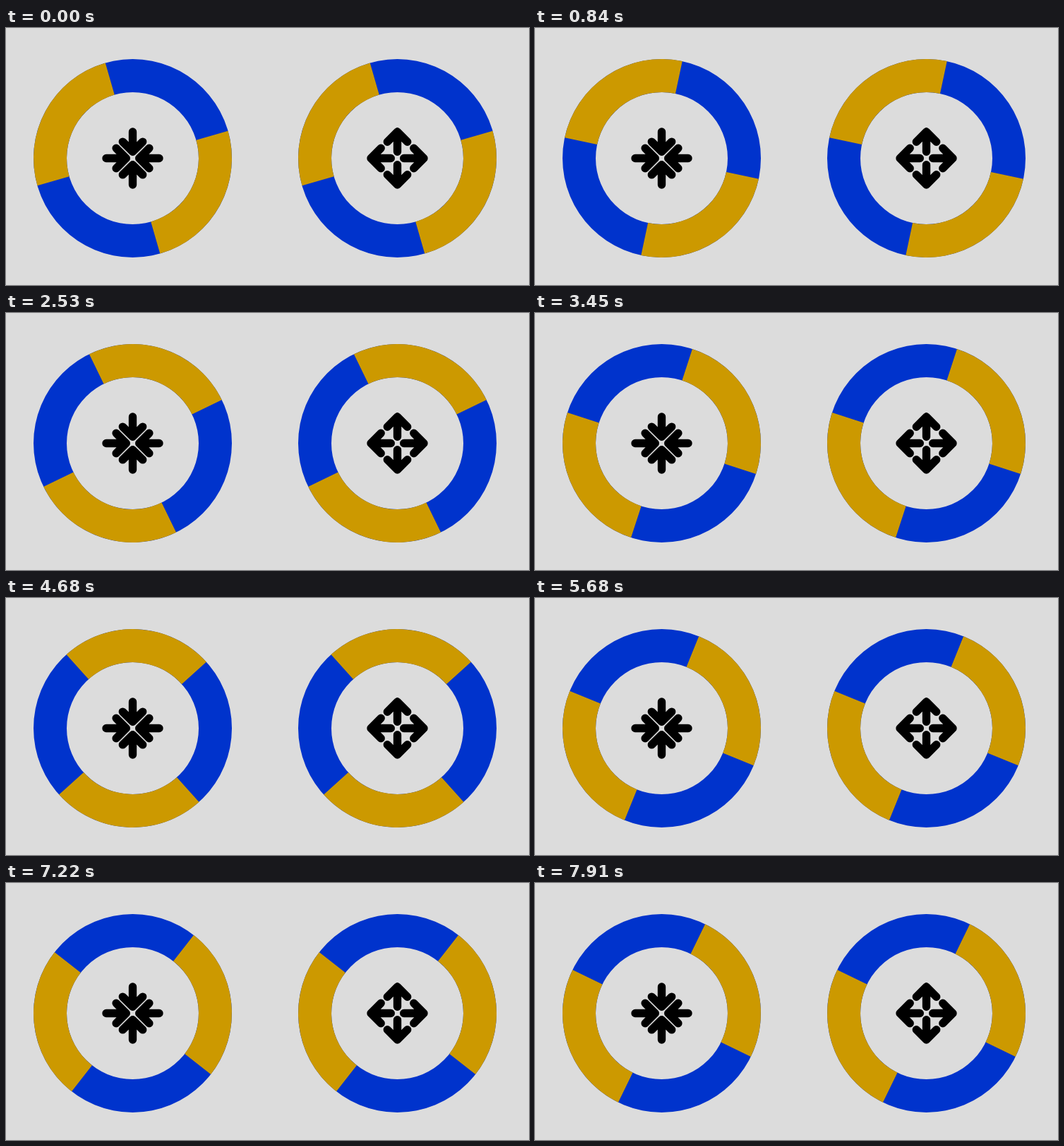
Animation of 741 by 364 pixels, one loop 7990 ms. Source, as an HTML page with a canvas:

```html
<!DOCTYPE html>
<html lang="en">
<head>
<meta charset="utf-8">
<title>Turning rings</title>
<style>
  html, body { margin: 0; width: 100%; height: 100%; overflow: hidden; background: #dcdcdc; }
  canvas { display: block; }
</style>
</head>
<body>
<canvas id="stage" width="741" height="364"></canvas>
<script>
const ctx = document.getElementById('stage').getContext('2d');

const LOOP = 7990;
const FRAMES = 104;
const LEAD = 11;              // ms by which each change leads an even beat
const STEPS_PER_FRAME = 4.69; // the rings turn in whole steps of 4 degrees
const STEP = 4;
const START = -16;

const BLUE = '#0033cc';
const GOLD = '#cc9900';
const OUTER = 140.5;
const INNER = 93.5;
const CY = 184.5;

const rad = deg => deg * Math.PI / 180;

function sector(from, sweep, color) {
  ctx.beginPath();
  ctx.arc(0, 0, OUTER, rad(from), rad(from + sweep));
  ctx.arc(0, 0, INNER, rad(from + sweep), rad(from), true);
  ctx.closePath();
  ctx.fillStyle = color;
  ctx.fill();
}

// Angle is where a blue quarter begins, clockwise from the top.
function ring(angle) {
  sector(0, 360, BLUE);
  sector(angle, 90, GOLD);
  sector(angle + 180, 90, GOLD);
}

function arrows(tip, tail) {
  const arm = 14.2 * Math.sign(tail - tip);
  ctx.strokeStyle = '#000';
  ctx.lineWidth = 11.4;
  ctx.lineCap = ctx.lineJoin = 'round';
  for (let i = 0; i < 4; i++) {
    ctx.beginPath();
    ctx.moveTo(0, -tail);
    ctx.lineTo(0, -tip);
    ctx.moveTo(-arm, -tip - arm);
    ctx.lineTo(0, -tip);
    ctx.lineTo(arm, -tip - arm);
    ctx.stroke();
    ctx.rotate(Math.PI / 2);
  }
}

function wheel(cx, angle, tip, tail) {
  ctx.save();
  ctx.translate(cx, CY);
  ring(angle);
  arrows(tip, tail);
  ctx.restore();
}

function draw(time) {
  const t = time % LOOP;
  const frame = Math.min(FRAMES - 1, Math.floor((t + LEAD) * FRAMES / LOOP));
  const angle = START + STEP * Math.floor(frame * STEPS_PER_FRAME + 0.5);

  ctx.fillStyle = '#dcdcdc';
  ctx.fillRect(0, 0, 741, 364);
  wheel(179.5, angle, 9.2, 37.5);
  wheel(554.5, angle, 37.5, 9.2);
}

const origin = performance.now();
function tick() {
  draw(performance.now() - origin);
  requestAnimationFrame(tick);
}
tick();
</script>
</body>
</html>
```
